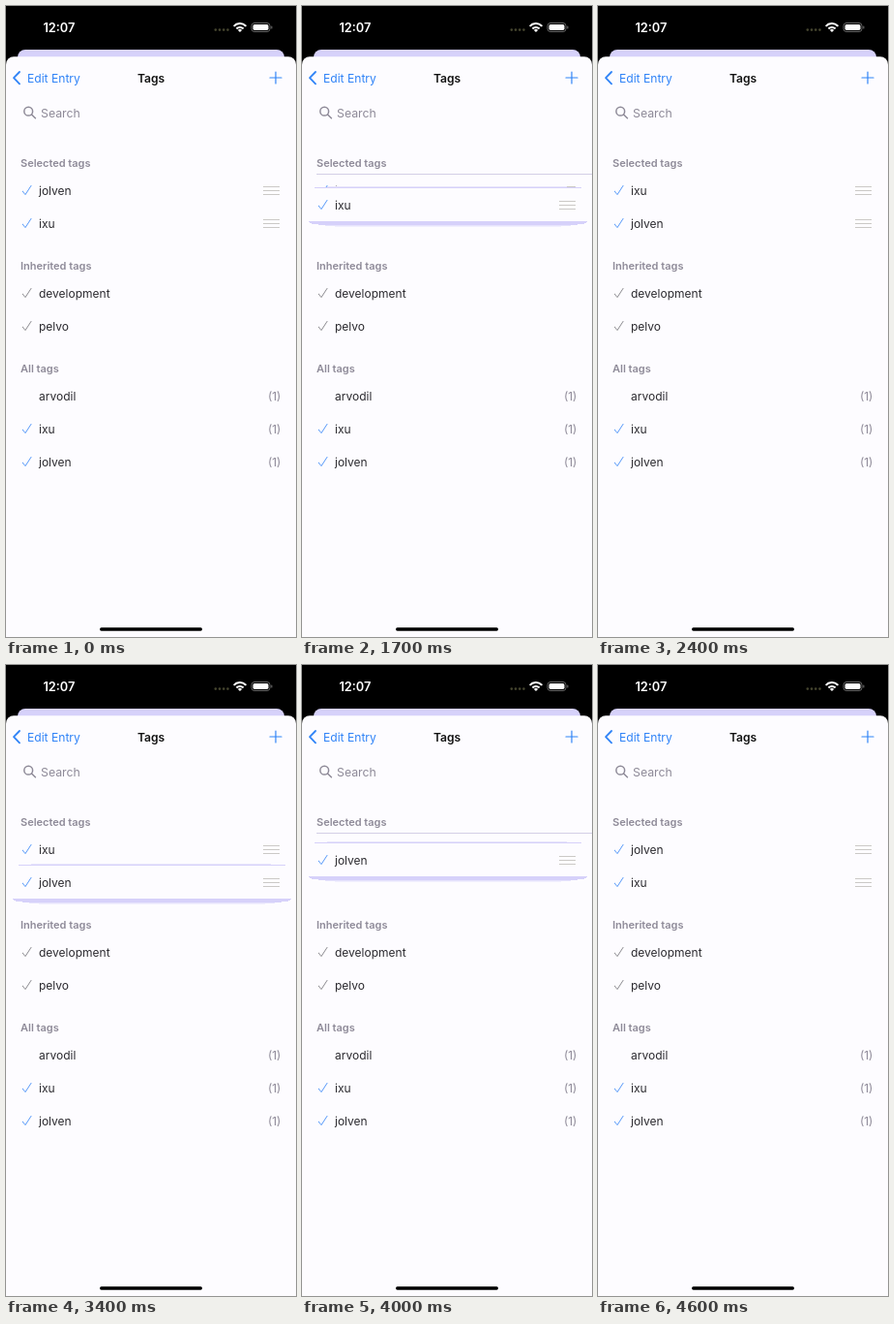
These frames come from a looping animation (300x651 px, 4700 ms). An HTML page with a canvas:

```html
<!DOCTYPE html>
<html lang="en">
<head>
<meta charset="utf-8">
<title>Reordering tags</title>
<style>
  html, body { margin: 0; width: 100%; height: 100%; overflow: hidden; background: #000; }
  canvas { display: block; width: 300px; height: 651px; }
</style>
</head>
<body>
<canvas id="stage"></canvas>
<script>
const W = 300, H = 651, LOOP = 4700, STEP = 100;
const BLUE = '#2f83f7', INK = '#2b2a2f', GREY = '#8e8a98', PAPER = '#fdfcff', LILAC = '#d6d1fa';
const CHECK = '#4c93f8', FAINT = '#85848a', GRIP = '#cbc9c6';
const FIRST = 190, SECOND = 224;
const A = 'jolven', B = 'ixu';

// Each drag lifts the lower row to the top: [time, row centre]
const drags = [
  { row: B, other: A, swap: 1700, path: [[1300, 223], [1400, 221], [1500, 216.5], [1600, 211],
    [1700, 205], [1800, 199], [1900, 193], [2000, 189], [2100, 187], [2300, 188.5], [2400, 190]] },
  { row: A, other: B, swap: 3900, path: [[3400, 224], [3500, 222.5], [3700, 216], [3900, 206],
    [4000, 201], [4200, 191.5], [4300, 188.5], [4400, 188], [4500, 189], [4600, 190]] }
];

const canvas = document.getElementById('stage');
const ctx = canvas.getContext('2d');
const ratio = window.devicePixelRatio || 1;
canvas.width = W * ratio;
canvas.height = H * ratio;
ctx.scale(ratio, ratio);

function text(str, x, y, size, color, weight = 400, align = 'left') {
  ctx.font = `${weight} ${size}px Inter, Roboto, sans-serif`;
  ctx.textAlign = align;
  ctx.fillStyle = color;
  ctx.fillText(str, x, y);
}

function box(x, y, w, h, r, color) {
  ctx.fillStyle = color;
  ctx.beginPath();
  ctx.roundRect(x, y, w, h, r);
  ctx.fill();
}

function line(points, color, width) {
  ctx.beginPath();
  points.forEach(([x, y]) => ctx.lineTo(x, y));
  ctx.strokeStyle = color;
  ctx.lineWidth = width;
  ctx.stroke();
}

function check(y, color) {
  line([[17, y + 1], [20, y + 4.6], [26, y - 4.6]], color, 0.95);
}

function tag(name, y, color) {
  if (color) check(y, color);
  text(name, 34, y + 4.5, 12, INK);
}

function selected(name, y) {
  tag(name, y, CHECK);
  ctx.fillStyle = GRIP;
  for (const dy of [-4, 0, 4]) ctx.fillRect(266, Math.round(y) + dy, 17, 1);
}

function statusBar() {
  text('12:07', 38.4, 27, 12.8, '#fff', 600);
  for (let i = 0; i < 4; i++) box(215.5 + i * 4.2, 23.3, 2.6, 2.6, 1.3, '#45452f');
  ctx.lineCap = 'butt';
  for (const r of [4.9, 8.7]) {
    ctx.beginPath();
    ctx.arc(242, 26.8, r, -Math.PI * 0.76, -Math.PI * 0.24);
    ctx.strokeStyle = '#fff';
    ctx.lineWidth = 2;
    ctx.stroke();
  }
  ctx.beginPath();
  ctx.moveTo(242, 27);
  ctx.arc(242, 26.8, 2.8, -Math.PI * 0.76, -Math.PI * 0.24);
  ctx.fillStyle = '#fff';
  ctx.fill();
  ctx.beginPath();
  ctx.roundRect(254, 17.5, 19, 9, 3);
  ctx.strokeStyle = '#666';
  ctx.lineWidth = 1;
  ctx.stroke();
  box(255.5, 19, 16, 6, 1.7, '#fff');
  box(274.2, 20.5, 1.2, 3, 0.6, '#666');
}

function sheet() {
  ctx.fillStyle = '#000';
  ctx.fillRect(0, 0, W, H);
  statusBar();
  box(12, 45, 276, 20, [8, 8, 0, 0], LILAC);
  box(0, 52.2, W, H - 52.2, [8, 8, 0, 0], PAPER);

  ctx.lineCap = 'round';
  ctx.lineJoin = 'round';
  line([[14, 68], [8, 74.2], [14, 80.4]], BLUE, 1.8);
  text('Edit Entry', 22, 78.8, 12.1, BLUE);
  text('Tags', 150, 78.8, 12.1, '#111', 600, 'center');
  line([[273, 74], [285, 74]], BLUE, 1.2);
  line([[279, 68], [279, 80]], BLUE, 1.2);

  ctx.beginPath();
  ctx.arc(23.2, 108.7, 4.4, 0, Math.PI * 2);
  ctx.strokeStyle = GREY;
  ctx.lineWidth = 1.5;
  ctx.stroke();
  line([[26.5, 112], [30.4, 115.8]], GREY, 1.5);
  text('Search', 36, 114.8, 12.3, GREY);

  [['Selected tags', 162], ['Inherited tags', 268], ['All tags', 374]]
    .forEach(([label, y]) => text(label, 15, y + 4.3, 11, GREY, 600));
  tag('development', 296, FAINT);
  tag('pelvo', 330, FAINT);
  ['arvodil', B, A].forEach((name, i) => {
    const y = 402 + i * 34;
    tag(name, y, i ? CHECK : null);
    text('(1)', 284.4, y + 4.5, 11.8, GREY, 400, 'right');
  });
  box(97, 641.3, 106, 3.4, 1.7, '#000');
}

function along(path, t) {
  const i = Math.max(1, path.findIndex(p => p[0] >= t));
  const [t0, y0] = path[i - 1], [t1, y1] = path[i];
  return y0 + (y1 - y0) * (t - t0) / (t1 - t0);
}

function ease(p) {
  p = Math.min(1, Math.max(0, p));
  return p * p * (3 - 2 * p);
}

function lifted(name, y) {
  const top = Math.round(y) - 18, bottom = Math.round(y) + 17;
  ctx.fillStyle = PAPER;
  ctx.fillRect(0, top, W, bottom - top);
  ctx.fillStyle = '#e8e5fb';
  ctx.fillRect(26, top - 1, 248, 1);
  ctx.fillStyle = LILAC;
  ctx.fillRect(13, top, 276, 1);
  // Shadow narrows as it falls below the row
  [[7, LILAC], [8, LILAC], [10, LILAC], [17, LILAC], [24, '#e6e3fc'], [34, '#f1effe']].forEach(([inset, color], i) => {
    ctx.fillStyle = color;
    ctx.fillRect(inset, bottom + i, 302 - inset * 2, 1);
  });
  selected(name, y);
}

function draw(time) {
  const t = Math.floor((time % LOOP) / STEP) * STEP;
  sheet();
  const drag = drags.find(({ path }) => t >= path[0][0] && t < path[path.length - 1][0]);
  if (!drag) {
    const swapped = t >= 2400 && t < 3400;
    selected(swapped ? B : A, FIRST);
    selected(swapped ? A : B, SECOND);
    return;
  }
  const y = along(drag.path, t);
  selected(drag.other, FIRST + (SECOND - FIRST) * ease((t - drag.swap) / 400));
  if (y > 195 && y < 216) {
    ctx.fillStyle = '#d3cfe6';
    ctx.fillRect(15, 173, 285, 1);
  }
  lifted(drag.row, y);
}

const start = performance.now();
function tick() {
  draw(performance.now() - start);
  requestAnimationFrame(tick);
}
tick();
</script>
</body>
</html>
```
